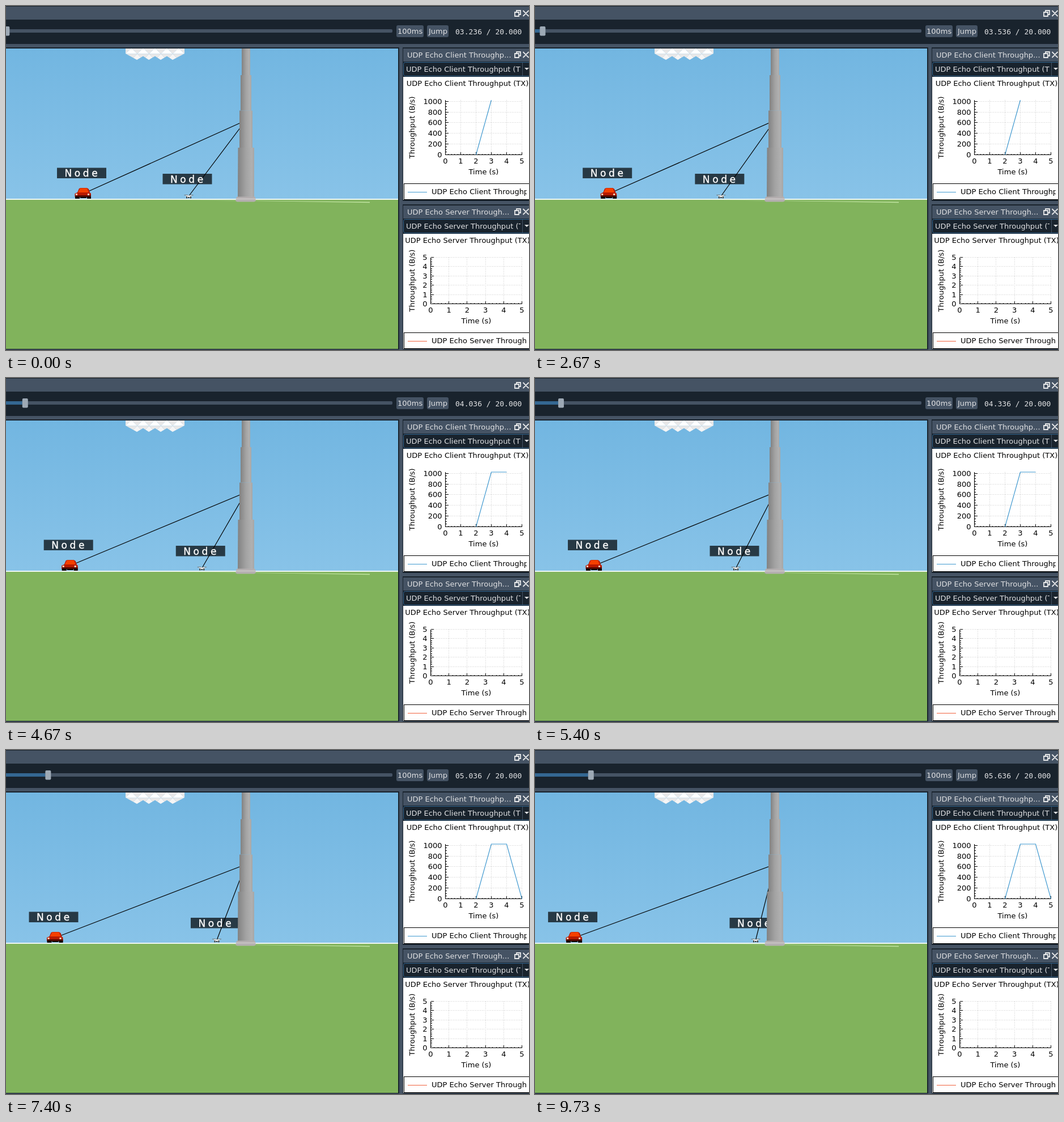
Animation, 923 px wide and 607 px high, one loop 9800 ms. Source, as an HTML page:

```html
<!DOCTYPE html>
<html lang="en">
<head>
<meta charset="utf-8">
<title>Network simulation playback</title>
<style>
  html, body { margin: 0; width: 100%; height: 100%; overflow: hidden; background: #19232d; }
  svg { display: block; }
  text { font: 13px "DejaVu Sans", sans-serif; white-space: pre; }
  .ui { fill: #e0e1e3; }
  .clock { font-family: "DejaVu Sans Mono", monospace; }
  .tag text { font-size: 17px; letter-spacing: 4.6px; fill: #fff; stroke: #fff; stroke-width: .35px; }
  .bar { fill: #455364; }
  .mid { text-anchor: middle; }
  .end { text-anchor: end; }
  .grid, .axis { shape-rendering: crispEdges; fill: none; }
  .grid { stroke: #c8c8c8; stroke-dasharray: 1 2; }
  .axis { stroke: #000; }
  .icon { stroke: #e8e9ea; stroke-width: 1.8; fill: none; }
</style>
</head>
<body>
<svg width="923" height="607" viewBox="0 0 923 607">
  <defs>
    <linearGradient id="sky" x2="0" y2="1">
      <stop stop-color="#72b6e1"/><stop offset="1" stop-color="#88c3e8"/>
    </linearGradient>
    <linearGradient id="steel">
      <stop stop-color="#828282"/><stop offset=".5" stop-color="#a3a3a3"/>
      <stop offset=".85" stop-color="#b0b0b0"/><stop offset="1" stop-color="#a6a6a6"/>
    </linearGradient>
    <clipPath id="view"><path d="M0 75H692V605H0z"/></clipPath>
    <clipPath id="puff"><path d="M211 75V84L231 95 242 88.500 252 95 263 88.500 273 95 284 88.500 294 95 315 84V75z"/></clipPath>
    <clipPath id="combo"><path d="M702 0H908V607H702z"/></clipPath>
    <clipPath id="legend"><path d="M702 0H919V607H702z"/></clipPath>
    <g id="tag" class="tag">
      <path d="M0 0H87V18.500H0z" fill-opacity=".7"/>
      <text x="13.500" y="15.500">Node</text>
    </g>
  </defs>

  <!-- toolbar and dock frames -->
  <path class="bar" d="M0 1H923V24H0zM0 67H923V73H0zM694 73H700V607H694zM700 344H923V350H700zM0 606H923V607H0z"/>
  <rect class="bar" x="-5" y="41" width="687" height="6" rx="2"/>
  <rect id="played" x="-5" y="41" width="5" height="6" fill="#346792"/>
  <rect id="thumb" y="36" width="10" height="16.500" rx="2" fill="#9da9b5"/>
  <rect class="bar" x="689" y="34" width="48" height="21" rx="3"/>
  <rect class="bar" x="743" y="34" width="38" height="21" rx="3"/>
  <text class="ui" x="691" y="49">100ms</text>
  <text class="ui" x="746" y="49">Jump</text>
  <text class="ui clock" id="clock" x="793" y="50"></text>

  <!-- scene -->
  <g clip-path="url(#view)">
    <path fill="url(#sky)" d="M0 75H692V341H0z"/>
    <path fill="#81b35c" d="M0 341H692V605H0z"/>
    <path fill="#eef7f4" d="M0 340H692V342H0z"/>
    <path fill="#c1e5a2" d="M300 342L642 345.800V347.200L440 344z"/>
    <g id="cloud" clip-path="url(#puff)"></g>
    <path id="links" stroke="#000" stroke-width="1.200" fill="none"/>
    <g id="car">
      <use href="#tag" x="90" y="285.500"/>
      <path fill="#b81a00" d="M121.500 331L126 329 129 322 132 321H143L146 323 148 329 150 331V337H121.500z"/>
      <path fill="#f54000" d="M127 329L131 321.500H143L146 329z"/>
      <path fill="#560800" d="M122 334H150V337.500H122z"/>
      <path fill="#f6d7bd" d="M123 331H126V334H123zM144 331H147V334H144z"/>
      <path fill="#0c0403" d="M122 336.500H130V340H122zM131 337H142V339H131zM143 336.500H150V340H143z"/>
    </g>
    <g id="drone">
      <use href="#tag" x="276.500" y="296"/>
      <path fill="#777f82" d="M314.500 333H321V334.200H314.500zM324 333H330.500V334.200H324z"/>
      <path fill="#e8e8e8" d="M317 334.200H328L326 338H319z"/>
      <path fill="#3f4141" d="M318 336H320V339.500H318zM325 336H327V339.500H325zM321 337H324V339H321z"/>
    </g>
    <g fill="url(#steel)">
      <path d="M416 75H431V122H416z"/>
      <path d="M414 122H433V184.500H414z"/>
      <path d="M412 184.500H435V250H412z"/>
      <path d="M409.500 250H438V338H409z"/>
    </g>
    <path fill="#b5b0b1" d="M407 336.500H439.500L441 344 438 345.500H408L405 344z"/>
    <path stroke="#d7d2d3" d="M406 340.500H441"/>
  </g>
  <path id="cursor" fill="#fff" stroke="#000" d="M20.500 599H30L33 602 37 605 39 608H23V603z"/>
  <g id="docks"></g>
</svg>
<script>
const $ = id => document.getElementById(id);
const LOOP = 9800;
// Moments at which the clock and the nodes advance by one 100 ms simulation step
const clockSteps = [2200, 2270, 2670, 3000, 3330, 3930, 4270, 4670, 4900, 5130, 5400, 5670, 5930,
  6330, 6600, 6930, 7270, 7400, 7730, 8070, 8530, 9070, 9400, 9730];
const nodeSteps = [2270, 2670, 3000, 3330, 3600, 3930, 4670, 4670, 4900, 5130, 5400, 5670, 5930,
  6330, 6600, 6930, 7270, 7670, 8000, 8330, 8730, 9070, 9400];

function icons(y) {
  return `<path class="icon" d="M898 ${y - 2}h7v7h-7zM901 ${y - 2}v-3h7v7h-3M912.5 ${y - 5}l10 10m0 -10l-10 10"/>`;
}

function label(x, y, text, cls = "", extra = "") {
  return `<text class="${cls}" x="${x}" y="${Math.round(y)}" ${extra}>${text}</text>`;
}

function chart({ dy, name, left, top, bottom, step, minor, max, color, id }) {
  const px = v => left + v * (910.5 - left) / 5;
  const py = v => bottom - v * (bottom - top) / max;
  let grid = "", ticks = "", labels = "";
  for (let v = 0; v <= 5; v++) {
    grid += `M${px(v)} ${top}V${bottom}`;
    labels += label(px(v), bottom + 15.5, v, "mid");
  }
  for (let i = 0; i <= 25; i++) ticks += `M${px(i / 5)} ${bottom}v${i % 5 ? -2 : -5}`;
  for (let i = 0; i * step / minor <= max; i++) {
    const v = i * step / minor, major = i % minor === 0;
    ticks += `M${left} ${py(v)}h${major ? 5 : 2}`;
    if (!major) continue;
    grid += `M${left} ${py(v)}H911`;
    labels += label(left - 6, py(v) + 4.5, v, "end");
  }
  const title = `UDP Echo ${name} Throughput (TX)`;
  const cut = name === "Client" ? "Throughp..." : "Through...";
  const mid = (top + bottom) / 2;
  const box = bottom + 51;
  return `<path class="bar" d="M701 ${75 + dy}H923v23H701z"/>
    ${label(708, 91 + dy, `UDP Echo ${name} ${cut}`, "ui")}${icons(86 + dy)}
    <rect x="701.5" y="${99.5 + dy}" width="230" height="24" rx="3" fill="#19232d" stroke="#346792"/>
    <g clip-path="url(#combo)">${label(706, 116 + dy, title, "ui")}</g>
    <path d="M911.500 ${100 + dy}v23" stroke="#455364"/>
    <path class="ui" d="M915 ${109 + dy}h8l-4 4z"/>
    <path fill="#fff" d="M701 ${125 + dy}H923V${box + 28.5}H701z"/>
    ${label(814.5, 141 + dy, title, "mid")}
    <path class="grid" d="${grid}"/>
    <path class="axis" d="M${left} ${top}V${bottom}H911${ticks}"/>
    ${labels}
    ${label((left + 910.5) / 2, bottom + 34.5, "Time (s)", "mid")}
    ${label(0, 0, "Throughput (B/s)", "mid", `transform="translate(721 ${mid}) rotate(-90)"`)}
    <polyline id="${id}" fill="none" stroke="${color}" stroke-width="1.200"/>
    <path class="axis" d="M930 ${box}H702.500V${box + 28}H930"/>
    <path d="M709 ${box + 15}h34" stroke="${color}"/>
    <g clip-path="url(#legend)">${label(751, box + 18.5, title)}</g>`;
}

$("docks").innerHTML = icons(13) +
  chart({ dy: 0, name: "Client", left: 775.5, top: 166, bottom: 262.5, step: 200, minor: 4, max: 1024,
    color: "#3f98cf", id: "sent" }) +
  chart({ dy: 277, name: "Server", left: 749.5, top: 443.5, bottom: 525.5, step: 1, minor: 5, max: 5,
    color: "#f0623e", id: "echoed" });

// Faceted cloud underside
const whites = ["#ffffff", "#f6f5f5", "#e9e8e8"];
let facets = "";
for (let row = 0; row < 2; row++)
  for (let i = -1; i < 12; i++) {
    const x = 200.6 + i * 10.4, y = 74 + row * 10.5, down = (i + row) % 2 === 0;
    const [a, b] = down ? [y, y + 10.5] : [y + 10.5, y];
    facets += `<path fill="${down ? whites[2] : whites[row]}" d="M${x} ${a}h20.800L${x + 10.4} ${b}z"/>`;
  }
$("cloud").innerHTML = facets;

const count = (steps, t) => steps.filter(s => s <= t).length;

function draw(t) {
  const tick = count(clockSteps, t), shift = 2.91 * count(nodeSteps, t);
  const thumb = -3.7 + 4.06 * tick;
  $("thumb").setAttribute("x", thumb);
  $("played").setAttribute("width", thumb + 5);
  $("clock").textContent = (3.236 + tick / 10).toFixed(3).padStart(6, "0") + " / 20.000";
  $("car").setAttribute("transform", `translate(${-shift})`);
  $("drone").setAttribute("transform", `translate(${shift})`);
  $("links").setAttribute("d", `M${135.5 - shift} 331.500L423 202L${322.5 + shift} 335.500`);
  $("cursor").style.display = t >= 2130 && t < 2200 ? "" : "none";
  const points = ["829.500,262.500", "856.500,166", "883.500,166", "910.500,262.500"];
  $("sent").setAttribute("points", points.slice(0, tick < 8 ? 2 : tick < 18 ? 3 : 4).join(" "));
}

const start = performance.now();
function loop() {
  draw((performance.now() - start) % LOOP);
  requestAnimationFrame(loop);
}
loop();
</script>
</body>
</html>
```
